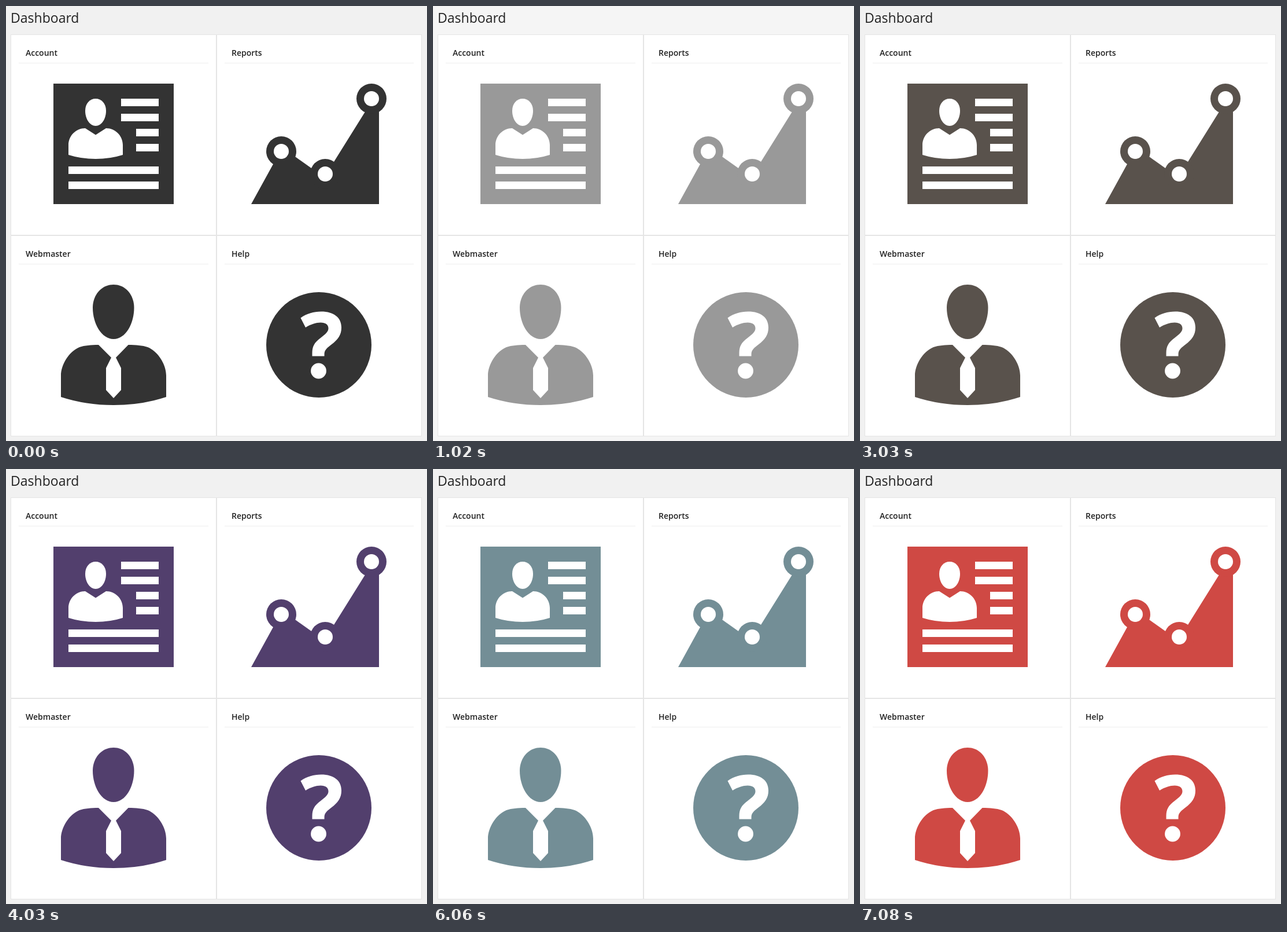
These frames come from a looping animation (728 px wide and 751 px high, 8.27 s). An HTML page:

```html
<!DOCTYPE html>
<html lang="en">
<head>
<meta charset="utf-8">
<title>Dashboard</title>
<style>
  html, body { margin: 0; width: 100%; height: 100%; overflow: hidden; background: #f1f1f1; }
  svg { display: block; width: 728px; height: 751px; font-family: "Open Sans", sans-serif; }
  .card { fill: #fff; stroke: #e5e5e5; }
  .rule { stroke: #eee; }
  .white { fill: #fff; }
  text { fill: #222; }
  .label { font-size: 14px; font-weight: 600; }
</style>
</head>
<body>
<svg viewBox="0 0 728 751">
  <text x="8" y="29" font-size="23">Dashboard</text>
  <g id="cards"></g>

  <g id="icons" fill="currentColor">
    <g id="account">
      <path d="M82 134h208v208H82z"/>
      <g class="white">
        <path d="M155 160C165 160 173 168 173 181C173 195 165 207 155 207S137 195 137 181C137 168 145 160 155 160Z"/>
        <path d="M137 211L155 222.5L173 211C189 211 202 224 202 240V257Q180 264 155 264T108 257V240C108 224 121 211 137 211Z"/>
        <path d="M199 160h65v13h-65zM199 186h65v13h-65zM225 212h39v13h-39zM225 238h39v13h-39zM108 277h156v13H108zM108 303h156v13H108z"/>
      </g>
    </g>

    <g id="reports">
      <path d="M424 342L476 247.6V243L552 297V293L632 165H645V342Z"/>
      <g id="points"></g>
    </g>

    <g id="webmaster">
      <path d="M186 481C207 481 221.5 499 221.5 521C221.5 548 207 575 186 575S150 548 150 521C150 499 165 481 186 481Z"/>
      <path d="M160 585L182 607L173 625V663L186 677L199 663V625L190 607L211.5 585C225 585 236 586 245 589C264 597 277 620 277 638V675Q234 689 186 689T95 675V638C95 620 108 597 127 589C136 586 147 585 160 585Z"/>
    </g>

    <g id="help">
      <circle cx="541" cy="585" r="91"/>
      <g class="white">
        <path d="M509.5 538.5C520 531 532 527.5 545 527.5C567 527.5 580 538 580 555C580 568 574 576 562 585C553 592 550.5 595 550.5 601V604.5H529.5V599C529.5 588 533 581 544 573C553 566 557.5 562 557.5 556.5C557.5 550 552.5 546.5 544 546.5C536 546.5 527 549.5 518 555Z"/>
        <circle cx="540.5" cy="630" r="13.4"/>
      </g>
    </g>
  </g>
</svg>

<script>
const LOOP = 8270;
const schemes = [
  { start: 0, color: "#333333" },
  { start: 1020, color: "#999999", page: "#f5f5f5" },
  { start: 2020, color: "#52accc" },
  { start: 3030, color: "#59524c" },
  { start: 4030, color: "#523f6d" },
  { start: 5040, color: "#363b3f" },
  { start: 6060, color: "#738e96" },
  { start: 7080, color: "#cf4944" }
];

const card = (label, x, y, width) => `
  <rect class="card" x="${x + .5}" y="${y + .5}" width="${width - 1}" height="346"/>
  <path class="rule" d="M${x + 14} ${y + 49.5}H${x + width - 14}"/>
  <text class="label" x="${x + 26}" y="${y + 37}">${label}</text>`;

const point = ([x, y]) => `
  <circle cx="${x}" cy="${y}" r="26"/>
  <circle class="white" cx="${x}" cy="${y}" r="13"/>`;

const byId = id => document.getElementById(id);
byId("cards").innerHTML =
  card("Account", 8, 49, 356) + card("Reports", 364, 49, 355) +
  card("Webmaster", 8, 396, 356) + card("Help", 364, 396, 355);
byId("points").innerHTML = [[476, 251], [552, 290], [632, 160]].map(point).join("");

const icons = byId("icons");

function draw(now) {
  const time = now % LOOP;
  const scheme = schemes.findLast(({ start }) => start <= time) || schemes[0];
  icons.style.color = scheme.color;
  document.body.style.background = scheme.page || "#f1f1f1";
  requestAnimationFrame(draw);
}
draw(performance.now());
</script>
</body>
</html>
```
